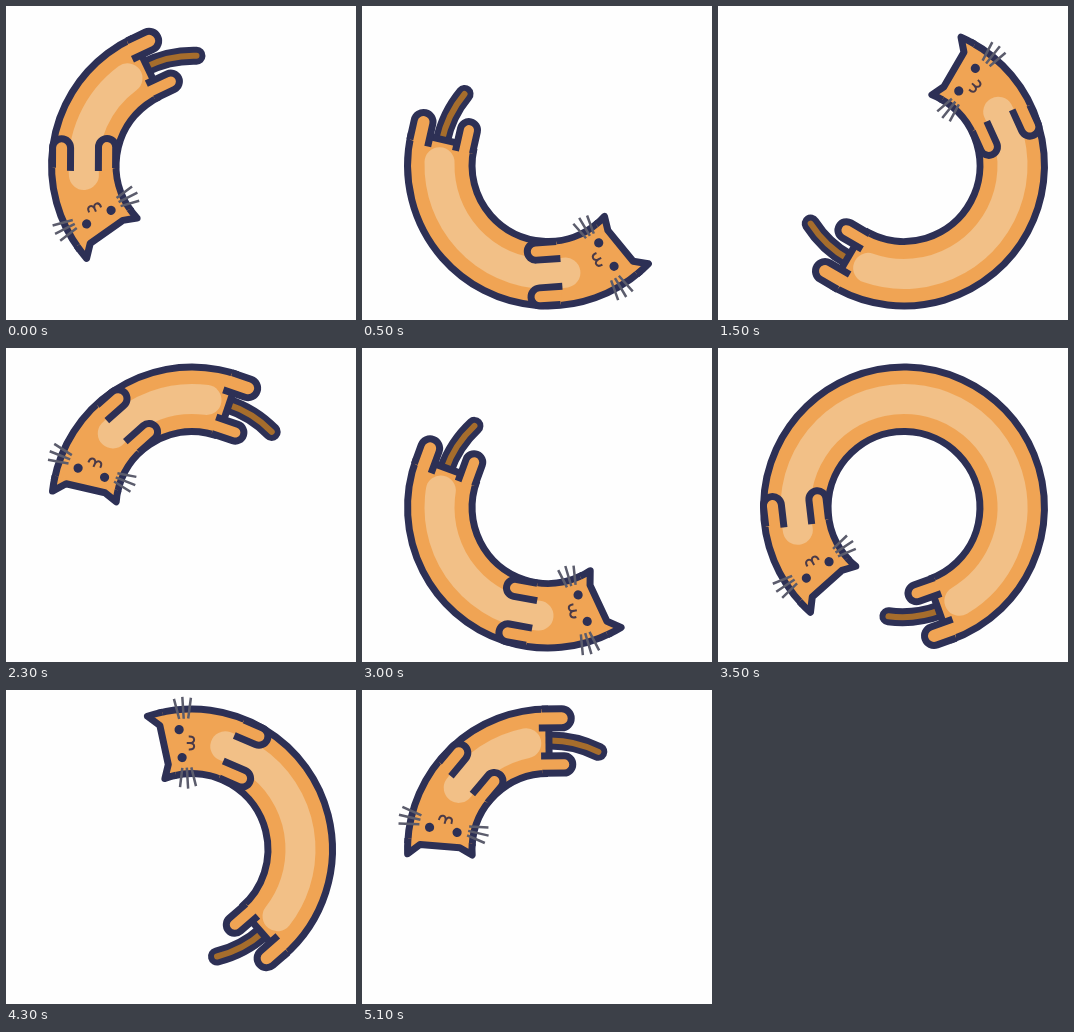
An HTML page that plays this animation: 350x314 px, repeating every 5.2 s.

```html
<!DOCTYPE html>
<html lang="en">
<head>
<meta charset="utf-8">
<title>Long cat loop</title>
<style>
  html, body { margin: 0; width: 100%; height: 100%; overflow: hidden; background: #fefefe; }
  svg { display: block; width: 350px; height: 314px; }
  .ring { fill: none; }
  .line { fill: #f0a454; stroke: #2d3055; stroke-width: 7; stroke-linejoin: round; }
  .whisker { fill: none; stroke: #5b5c6c; stroke-width: 2.5; }
  .dot { fill: #2d3055; }
</style>
</head>
<body>
<svg viewBox="0 0 350 314">
  <g transform="translate(186 159.5)">
    <g id="tail" class="ring" stroke-linecap="round">
      <path d="M-17-107.7A109 109 0 0 1 35.5-104" stroke="#2d3055" stroke-width="18"/>
      <path d="M-17-107.7A109 109 0 0 1 35.5-104" stroke="#a66d2c" stroke-width="6"/>
    </g>
    <circle class="ring" id="edge" r="108.2" pathLength="360" stroke="#2d3055" stroke-width="71.5"/>
    <circle class="ring" id="fur" r="108.2" pathLength="360" stroke="#f0a454" stroke-width="57.5"/>
    <circle class="ring" id="belly" r="108.5" pathLength="360" stroke="#f2c087" stroke-width="30" stroke-linecap="round"/>
    <g id="legs">
      <path class="line" d="M2-122V-93"/>
      <path class="line" d="M-8-121.5H15a9.5 9.5 0 0 0 0-19H-5"/>
      <path class="line" d="M-6-93.5H17a8.6 8.6 0 0 1 0 17.2H-5"/>
    </g>
    <g id="head">
      <path class="line" d="M19.5-139.1A140.5 140.5 0 0 0 4-140.4L12.5-127.5 7-88-1-76A76 76 0 0 1 10.6-75.3"/>
      <g transform="rotate(43.3)">
        <path class="line" d="M-6-121.5H17a9 9 0 0 0 0-18H-3"/>
        <path class="line" d="M-6-93.6H18a8.6 8.6 0 0 1 0 17.2H-3"/>
      </g>
      <g transform="rotate(14)">
        <circle class="dot" cy="-120.5" r="4.6"/>
        <circle class="dot" cy="-92.5" r="4.6"/>
      </g>
      <path class="whisker" transform="rotate(16.5)" d="M0-131V-153M-4.5-131L-8.5-151.5M4.5-131L8.5-151.5M0-82V-61M-4.5-82L-8-63M4.5-82L8-63"/>
      <path class="ring" transform="rotate(20) translate(0 -106.5)" d="M-3-6.5C4-7 4 0-2 0C4 0 4 7-3 6.5M-5 0H1" stroke="#4a3a48" stroke-width="2"/>
    </g>
  </g>
</svg>
<script>
  const LOOP = 5200, CYCLE = LOOP / 2, TURN = 720, STEP = 100;
  // One stretch cycle: [ms, head angle, rump angle], degrees clockwise from the top
  const keys = [
    [0, 227, 343.5], [600, 100, 275], [900, -122, 181], [1100, -232, 80],
    [1480, -340, -145], [1720, -379, -210], [2290, -445, -332.5], [2500, -453, -351]
  ];
  const $ = id => document.getElementById(id);

  // Key lookup that continues past both ends of the cycle
  function key(i, col) {
    const n = keys.length, lap = Math.floor(i / n);
    return keys[i - lap * n][col] + lap * (col ? -TURN : CYCLE);
  }
  const slope = (i, col) =>
    (key(i + 1, col) - key(i, col)) / (key(i + 1, 0) - key(i, 0));

  // Harmonic mean keeps the curve monotone
  function tangent(i, col) {
    const a = slope(i - 1, col), b = slope(i, col);
    return a * b > 0 ? 2 * a * b / (a + b) : 0;
  }

  function angleAt(ms, col) {
    let i = -1;
    while (key(i + 1, 0) <= ms) i++;
    const w = key(i + 1, 0) - key(i, 0), u = (ms - key(i, 0)) / w, v = 1 - u;
    return v * v * (1 + 2 * u) * key(i, col) + u * u * (3 - 2 * u) * key(i + 1, col)
      + u * v * w * (v * tangent(i, col) - u * tangent(i + 1, col));
  }

  const spin = (id, a) => $(id).setAttribute('transform', `rotate(${a})`);

  function arc(id, from, to) {
    spin(id, from - 90);
    $(id).setAttribute('stroke-dasharray', `${to - from} 720`);
  }

  function draw(t) {
    // The second cycle runs slightly ahead of the first
    const ms = t - 32 * Math.sin(2 * Math.PI * t / LOOP);
    const head = angleAt(ms, 1), rump = angleAt(ms, 2);
    spin('head', head);
    spin('tail', rump);
    spin('legs', rump - 9);
    arc('edge', head + 6, rump - 8.5);
    arc('fur', head + 6, rump - 8.5);
    arc('belly', head + 38, rump - 20);
  }

  function tick() {
    const t = performance.now() % LOOP;
    draw(t - t % STEP);
    requestAnimationFrame(tick);
  }
  tick();
</script>
</body>
</html>
```
